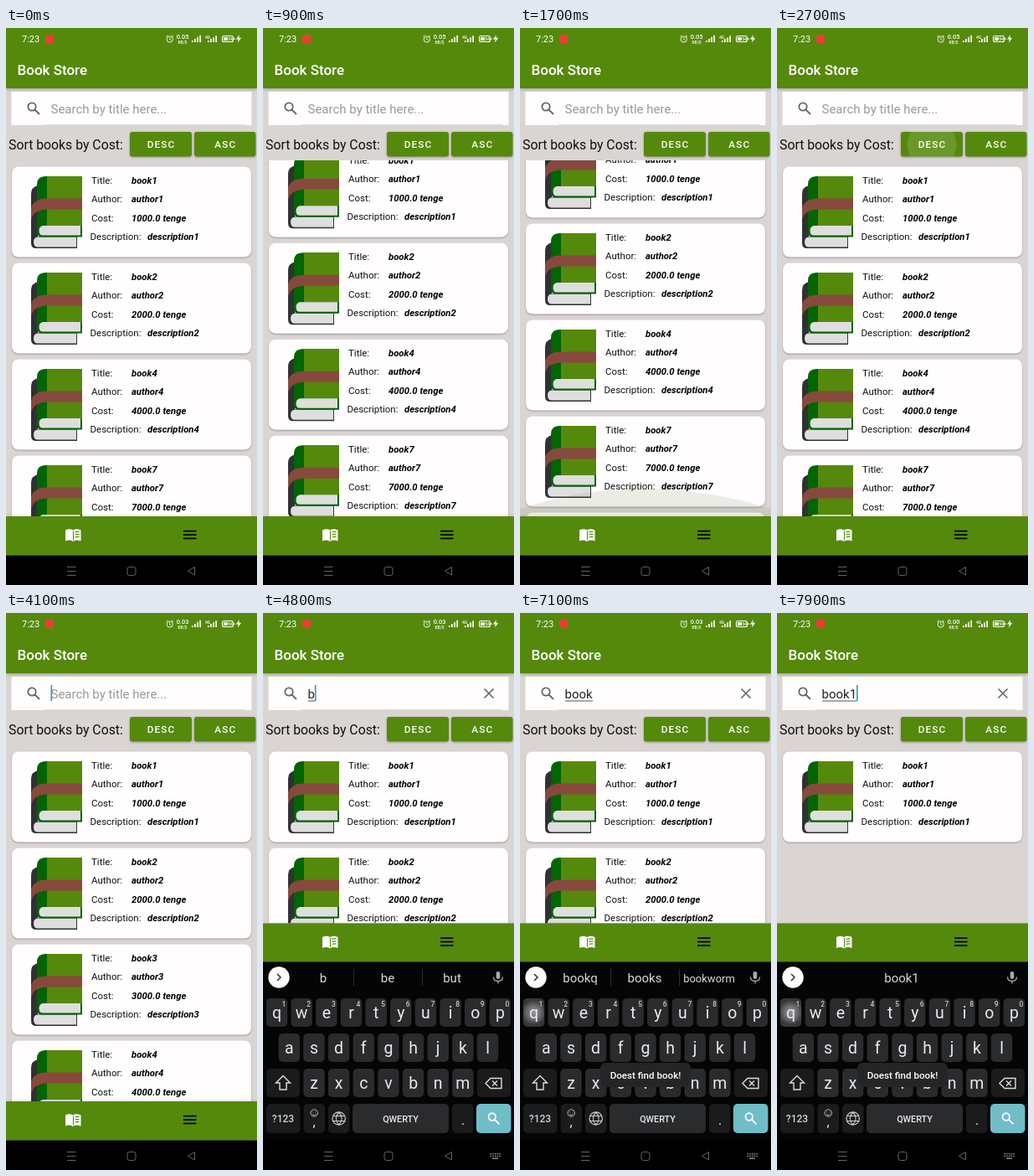
An HTML page with a canvas that plays this animation: 300 by 665 pixels, repeating every 8 s.

```html
<!DOCTYPE html>
<html lang="en">
<head>
<meta charset="utf-8">
<title>Book Store</title>
<style>
html, body { margin: 0; width: 100%; height: 100%; overflow: hidden; background: #000; }
canvas { display: block; width: 100vw; height: 100vh; }
</style>
</head>
<body>
<canvas id="stage"></canvas>
<script>
const W = 300, H = 665, LOOP = 8000;
const GREEN = '#55890c', GREY = '#dad5d3', KEY = '#2a2b2d', DARK_KEY = '#1a1b1c';
const canvas = document.getElementById('stage');
const ctx = canvas.getContext('2d');
const ratio = Math.max(1, window.devicePixelRatio || 1);
canvas.width = W * ratio;
canvas.height = H * ratio;

// Timelines: [start time, value]
const scrollStops = [[800, 0], [1000, 47], [1150, 47], [1300, 0], [1500, 0], [1650, 47],
  [1850, 47], [2000, 0], [2100, 0], [2200, 47], [2300, 47], [2450, 0]];
const glows = [[1080, 'bottom'], [1400, 'top'], [1700, 'bottom'], [2050, 'top'], [2250, 'bottom'], [2450, 'top']];
const orders = [[0, [1, 2, 4, 7, 3]], [3000, [7, 4, 3, 2, 1]], [3400, [1, 2, 3, 4, 7]], [7500, [1]]];
const queries = [[0, ''], [4700, 'b'], [5000, 'bo'], [5250, 'boo'], [5500, 'book'],
  [6000, 'bookq'], [6600, 'book'], [7500, 'book1']];
const suggestions = [[0, ['I', 'the', 'you']], [4700, ['b', 'be', 'but']], [5000, ['bo', 'book', 'box']],
  [5250, ['boo', 'book', 'books']], [5500, ['book', 'books', 'booking']],
  [6000, ['bookq', 'books', 'bookworm']], [7500, ['', 'book1', '']]];
const speeds = [[0, '0.05'], [3900, '0.03'], [7500, '0.00']];
const presses = [[4700, 4800, 'b'], [5000, 5100, 'o'], [5200, 5300, 'o'], [5500, 5600, 'k'],
  [5900, 6100, 'q'], [6600, 6700, 'back'], [6900, 8000, 'q']];
const edits = [4000, 4300, ...queries.slice(1).map(q => q[0])];

const clamp = x => Math.max(0, Math.min(1, x));
const ease = x => { x = clamp(x); return x * x * (3 - 2 * x); };
const at = (list, t) => list.filter(e => e[0] <= t).pop()[1];

function scrollAt(t) {
  let value = 0;
  scrollStops.forEach(([time, y], i) => {
    if (!i) return;
    const [t0, y0] = scrollStops[i - 1];
    if (t >= t0) value = y0 + (y - y0) * ease((t - t0) / (time - t0));
  });
  return value;
}

function text(s, x, y, size, color = '#000', weight = 400, align = 'left', spacing = 0) {
  ctx.font = `${weight} ${size}px Roboto, sans-serif`;
  ctx.textAlign = align;
  ctx.letterSpacing = spacing + 'px';
  ctx.fillStyle = color;
  ctx.fillText(s, x, y);
}
function rect(x, y, w, h, color, r = 0) {
  ctx.fillStyle = color;
  ctx.beginPath();
  ctx.roundRect(x, y, w, h, r);
  ctx.fill();
}
function circle(x, y, r, color) {
  ctx.fillStyle = color;
  ctx.beginPath();
  ctx.arc(x, y, r, 0, 7);
  ctx.fill();
}
function fill(d, color) {
  ctx.fillStyle = color;
  ctx.fill(new Path2D(d));
}
function stroke(d, color, width = 1) {
  ctx.strokeStyle = color;
  ctx.lineWidth = width;
  ctx.stroke(new Path2D(d));
}
function shadowed(blur, draw) {
  ctx.save();
  ctx.shadowColor = 'rgba(0,0,0,.3)';
  ctx.shadowBlur = blur * ratio;
  ctx.shadowOffsetY = ratio;
  draw();
  ctx.restore();
}

function drawStatus(t) {
  text('7:23', 19, 17, 11, '#fff');
  rect(47, 8, 10, 10, '#ee3d35', 2.5);
  stroke('M192.2 13.5a3.6 3.6 0 1 0 7.2 0a3.6 3.6 0 1 0-7.2 0M195.8 11.5v2.2l1.5 1M191.5 10.5l2-1.8M200 10.5l-2-1.8', '#fff', .9);
  text(at(speeds, t), 211, 13, 7.4, '#fff', 500, 'center');
  text('KB/S', 211, 18.5, 4.8, '#fff', 500, 'center');
  for (const x of [222, 241])
    for (let i = 0; i < 4; i++) {
      const h = 2 + i * (x === 222 ? 2.1 : 1.9);
      rect(x + i * 3.1, 17 - h, 1.7, h, '#fff');
    }
  text('4G', 238, 12.5, 5, '#fff', 500);
  stroke('M260.5 9.5h9q2 0 2 2v3q0 2-2 2h-9q-2 0-2-2v-3q0-2 2-2zM273 12v2', '#fff', 1.1);
  rect(260, 11, 5, 4, '#fff', 1);
  text('54', 268, 15, 5, '#fff', 500, 'center');
  fill('M279 8l-4 5.6h2.8l-.8 4 4.2-5.8h-2.9z', '#fff');
}

function drawBook() {
  fill('M38 188Q30 190 30 198V257Q30 263 36 263H85V249H38Z', '#303133');
  fill('M85 249.500H38Q33 250 33 255.500Q33 261.500 38 261.500H84V249.500Z', '#dedede');
  fill('M37 187Q37 177 47 177H91V249.500H42Q37 249 37 243Z', '#006502');
  fill('M49 177H91V236H49Z', GREEN);
  fill('M89 236H44Q39.500 237 39.500 242Q39.500 247.500 44 247.500H89Z', '#dedede');
  fill('M91 203.500H47Q34 204 30 214V228Q34 217 48 216.500H91Z', '#87493d');
}

function drawCard(n, y) {
  ctx.save();
  ctx.translate(0, y - 165);
  shadowed(2, () => rect(7, 165.5, 286, 108, '#fffdfe', 8));
  drawBook();
  [['Title:', 'book' + n], ['Author:', 'author' + n], ['Cost:', n + '000.0 tenge'],
    ['Description:', 'description' + n]].forEach(([label, value], i) => {
    const last = i === 3, base = 185.5 + i * 22.5;
    text(label, last ? 100.5 : 102, base, 11.5, '#111');
    text(value, last ? 169 : 150, base, 11.3, '#000', 'italic 700');
  });
  ctx.restore();
}

function drawGlow(t, bottom) {
  for (const [time, side] of glows) {
    const a = clamp(1.4 - Math.abs(t - time) / 100);
    if (!a) continue;
    const [base, dir] = side === 'top' ? [158, 1] : [bottom, -1];
    const edge = base + dir * 9 * a, control = base + dir * 57 * a;
    ctx.fillStyle = `rgba(80,100,50,${.11 * a})`;
    ctx.beginPath();
    ctx.moveTo(0, base);
    ctx.lineTo(0, edge);
    ctx.quadraticCurveTo(145, control, W, edge);
    ctx.lineTo(W, base);
    ctx.fill();
  }
}

function drawList(t, bottom) {
  ctx.save();
  ctx.beginPath();
  ctx.rect(0, 158, W, bottom - 158);
  ctx.clip();
  const scroll = scrollAt(t);
  at(orders, t).forEach((n, i) => drawCard(n, 165 + i * 115 - scroll));
  drawGlow(t, bottom);
  ctx.restore();
}

function drawSearch(t) {
  const query = at(queries, t);
  rect(6.5, 76, 287, 40, '#fffdfe');
  rect(46, 115, 240, 1, '#dcdcdc');
  stroke('M26.300 94a4.700 4.700 0 1 0 9.400 0a4.700 4.700 0 1 0-9.400 0M34.500 97.500L40 103', '#666', 1.8);
  text(query || 'Search by title here...', 53.5, 102, 15, query ? '#222' : '#999');
  const width = query ? ctx.measureText(query).width : 0;
  if (query) {
    rect(54, 104.5, width, 1, '#555');
    stroke('M264.500 90.500l11 11m0-11l-11 11', '#666', 1.6);
  }
  const edited = edits.filter(e => e <= t).pop();
  if (edited !== undefined && (t - edited) % 1000 < 500) rect(53.5 + width, 86, 1.6, 19, '#2a9cab');
}

function drawButton(label, x, w, t, pressed) {
  shadowed(3, () => rect(x, 124, w, 29.5, GREEN, 3));
  for (const start of pressed) {
    const p = (t - start) / 250;
    if (p < 0 || p > 1) continue;
    ctx.save();
    ctx.beginPath();
    ctx.roundRect(x, 124, w, 29.5, 3);
    ctx.clip();
    circle(x + w / 2, 139, 10 + 32 * p, `rgba(255,255,255,${.25 * (1 - p * .8)})`);
    ctx.restore();
  }
  text(label, x + w / 2 + .5, 143, 11.8, '#fff', 500, 'center', 1.05);
}

function drawNav(y) {
  shadowed(4, () => rect(0, y, W, 46.5, GREEN));
  ctx.save();
  ctx.translate(0, y);
  fill('M71 16.500Q76 14 80 16.500Q84 14 89.500 16.500V29.500Q84 27.500 80 30Q76 27.500 71 29.500Z', '#fff');
  stroke('M80.500 17.500v11M82.500 19q2.500-1 5-.5M82.500 22q2.500-1 5-.5M82.500 25q2.500-1 5-.5', GREEN, 1.1);
  for (const dy of [16.8, 21.2, 25.6]) rect(212, dy, 15.5, 1.7, '#000');
  ctx.restore();
}

function drawSystemBar(keyboard) {
  rect(0, 629.5, W, 36, '#000');
  stroke('M73 643.500h10.500M73 648.500h10.500M73 653.500h10.500M147.500 643.500h5q2.500 0 2.500 2.500v5q0 2.500-2.500 2.500h-5q-2.500 0-2.500-2.500v-5q0-2.500 2.500-2.500zM225.500 643.500v9.500l-8-4.750z', '#646464');
  if (!keyboard) return;
  for (let i = 0; i < 10; i++) rect(271.5 + i % 5 * 2.7, 645 + (i > 4) * 2.7, 1.6, 1.6, '#888');
  rect(274, 650.5, 7, 1.5, '#888');
}

function drawKey(x, y, w, h, color, pressed) {
  rect(x, y, w, h, color, 5);
  if (!pressed) return;
  const cx = x + w / 2, cy = y + h / 2;
  const light = ctx.createRadialGradient(cx, cy, 0, cx, cy, 15);
  light.addColorStop(0, 'rgba(255,255,255,.5)');
  light.addColorStop(.55, 'rgba(255,255,255,.3)');
  light.addColorStop(1, 'rgba(255,255,255,.05)');
  rect(x, y, w, h, light, 5);
}

function drawSuggestions(t) {
  const words = at(suggestions, t);
  circle(19, 435, 12.7, '#fff');
  stroke('M17 431l4 4-4 4', '#222', 1.4);
  words.forEach((word, i) => {
    ctx.font = '400 15px Roboto, sans-serif';
    ctx.letterSpacing = '0px';
    const size = ctx.measureText(word).width > 66 ? 13 : 15;
    text(word, 72 + i * 77, 441, size, '#d8dadc', 400, 'center');
  });
  if (words[0]) for (const x of [108, 190]) rect(x, 425, 1, 20, '#2c2d2e');
  rect(278.7, 428, 4.6, 9, '#aaa', 2.3);
  stroke('M275.500 434.500q0 5 5.500 5t5.500-5M281 439.500v3', '#aaa', 1.3);
}

function drawKeyboard(t, shift) {
  const down = presses.filter(p => t >= p[0] && t < p[1]).map(p => p[2]);
  ctx.save();
  ctx.translate(0, shift);
  rect(0, 416.5, W, 249, '#050505');
  drawSuggestions(t);
  [['qwertyuiop', 16.5, 460], ['asdfghjkl', 31.3, 502], ['zxcvbnm', 61, 544]].forEach(([letters, x0, y], row) => {
    [...letters].forEach((letter, i) => {
      const x = x0 + i * 29.65;
      drawKey(x - 12.7, y, 25.4, 34, KEY, down.includes(letter));
      text(letter, x, y + 23.5, 19.5, '#e8eaed', 400, 'center');
      if (!row) text((i + 1) % 10, x + 8.5, y + 10, 8.5, '#c8cacc', 500, 'center');
    });
  });
  drawKey(4, 544, 40, 34, DARK_KEY);
  stroke('M24 552.500l8.500 8.500h-4.500v8h-8v-8h-4.500z', '#ddd', 1.4);
  drawKey(256, 544, 40, 34, DARK_KEY, down.includes('back'));
  stroke('M272 555.500h13v12h-13l-6-6zM274 558.500l6 6m0-6l-6 6', '#ddd', 1.4);

  drawKey(4, 586, 40.5, 35, DARK_KEY);
  text('?123', 24, 608, 12, '#d0d2d4', 500, 'center');
  drawKey(48.5, 586, 25.5, 35, DARK_KEY);
  stroke('M57 597a4.200 4.200 0 1 0 8.400 0a4.200 4.200 0 1 0-8.400 0M59 598.500q2.200 2.500 4.400 0M59.500 595.500v.8M62.800 595.500v.8', '#ccc', .9);
  text(',', 61, 613, 16, '#e8eaed', 400, 'center');
  drawKey(78, 586, 25.5, 35, DARK_KEY);
  stroke('M83 603.500a7.700 7.700 0 1 0 15.400 0a7.700 7.700 0 1 0-15.400 0M90.700 596q-7 7.500 0 15.200q7-7.700 0-15.200M84 600.500h13.500M84 606.500h13.500', '#ccc', 1.2);
  drawKey(107, 586, 115, 35, KEY);
  text('QWERTY', 164.5, 607.5, 10.8, '#e8eaed', 500, 'center');
  drawKey(226, 586, 25.5, 35, DARK_KEY);
  text('.', 239, 611, 16, '#e8eaed', 400, 'center');
  drawKey(255, 586, 41.5, 35, '#70bcc8');
  stroke('M269.500 601.500a4.300 4.300 0 1 0 8.600 0a4.300 4.300 0 1 0-8.600 0M277 604.800l5.500 5.500', '#fff', 1.7);
  ctx.restore();
}

function drawToast(t) {
  ctx.globalAlpha = ease((t - 6050) / 200);
  rect(96, 537, 108, 29, '#242527', 6);
  text('Doest find book!', 150, 556, 11.6, '#fff', 500, 'center');
  ctx.globalAlpha = 1;
}

function draw(t) {
  ctx.setTransform(ratio, 0, 0, ratio, 0, 0);
  const rise = ease((t - 4230) / 160);
  const navTop = t >= 4350 ? 370.5 : 583;
  rect(0, 0, W, H, GREY);
  drawList(t, navTop);
  shadowed(4, () => rect(0, 0, W, 72, GREEN));
  drawStatus(t);
  text('Book Store', 13.5, 56, 17, '#fff', 500);
  drawSearch(t);
  text('Sort books by Cost:', 3, 145, 15.8, '#111');
  drawButton('DESC', 148, 74, t, [2550, 2950]);
  drawButton('ASC', 225, 73.5, t, [3250]);
  drawNav(navTop);
  if (rise) drawKeyboard(t, 249 * (1 - rise));
  drawSystemBar(rise);
  if (t > 6050) drawToast(t);
}

const start = performance.now();
function tick() {
  draw((performance.now() - start) % LOOP);
  requestAnimationFrame(tick);
}
tick();
</script>
</body>
</html>
```
